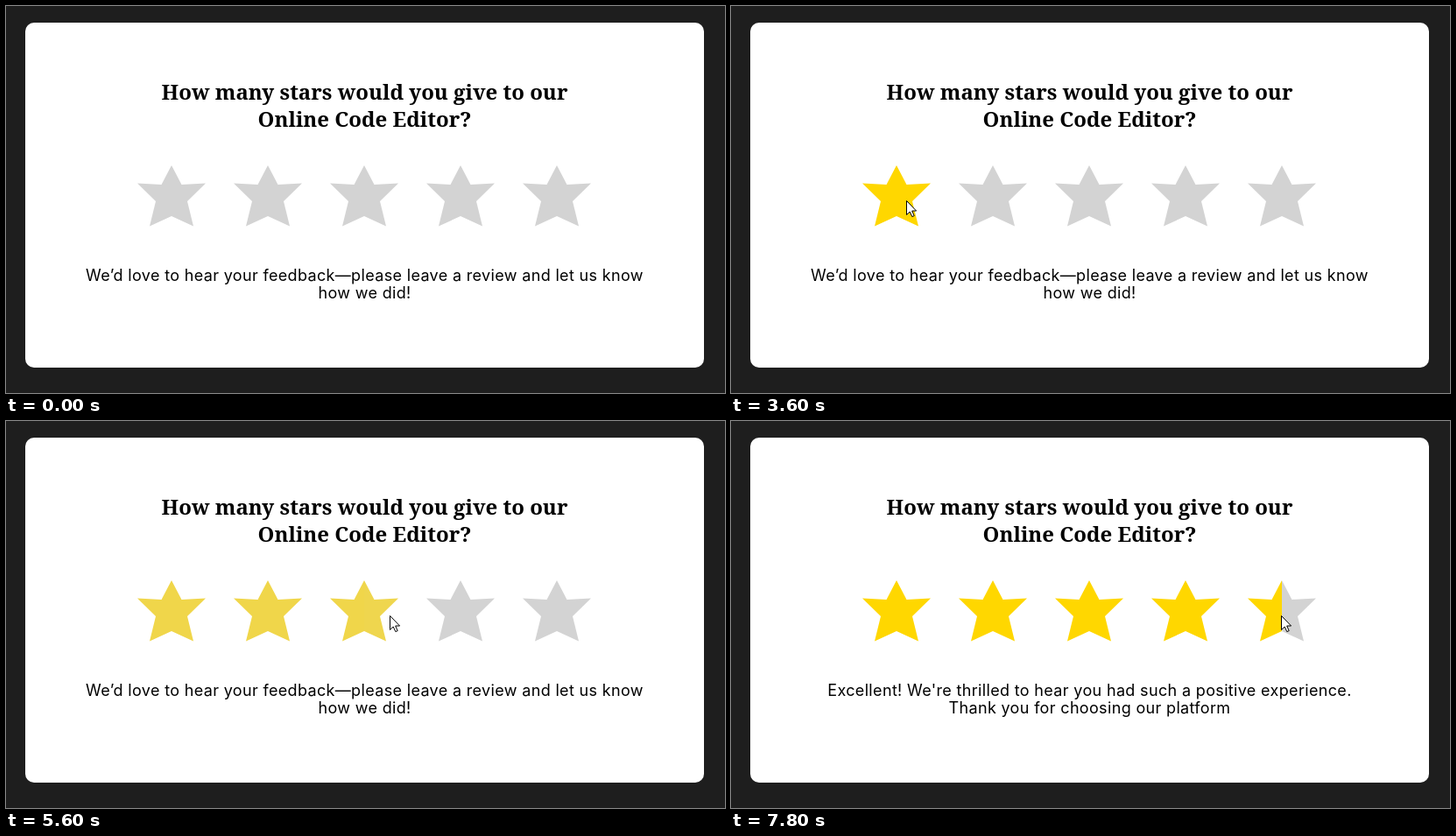
An HTML page for the animation above (8 s loop, 821x442 px).

```html
<!DOCTYPE html>
<html lang="en">
<head>
<meta charset="utf-8">
<title>Star rating</title>
<style>
  html, body { margin: 0; width: 100%; height: 100%; overflow: hidden; background: #1e1e1e; }
  svg { display: block; }
  text { text-anchor: middle; }
  .title { font: 700 24px "Noto Serif", serif; }
  .note { font: 400 18px Inter, sans-serif; letter-spacing: .34px; }
</style>
</head>
<body>
<svg width="821" height="442" viewBox="0 0 821 442">
  <rect x="22" y="19" width="775" height="394" rx="10" fill="#fff"/>
  <g class="title">
    <text x="409.5" y="107">How many stars would you give to our</text>
    <text x="409.5" y="138">Online Code Editor?</text>
  </g>
  <g id="stars"></g>
  <g class="note">
    <text x="409.5" y="314"></text>
    <text x="409.5" y="334"></text>
  </g>
  <path id="cursor" d="M.5 .5V16.5L4.2 13 6.8 18.6 9.2 17.6 6.7 12H11.6Z" fill="#fff" stroke="#000"/>
</svg>
<script>
const LOOP = 8000, FPS = 0.015, FADE = 300, CLICK = 7800;
const GREY = [211, 211, 211], GOLD = [255, 215, 0];
const PROMPT = ["We’d love to hear your feedback—please leave a review and let us know", "how we did!"];
const THANKS = ["Excellent! We're thrilled to hear you had such a positive experience.", "Thank you for choosing our platform"];

// Pointer path: time, x, y
const path = [
  [600, 359, 428], [1000, 240, 358], [1330, 172, 330], [1400, 172, 330],
  [2266, 159, 281], [2466, 155, 272], [2734, 155, 272], [3066, 179, 222],
  [3200, 179, 222], [3330, 200, 222], [3900, 200, 222], [4400, 280, 222],
  [4560, 299, 222], [4725, 317, 222], [5133, 391, 223], [5300, 409, 223],
  [5533, 428, 222], [5600, 438, 222], [6100, 501, 221], [6365, 519, 220],
  [6400, 525, 220], [6500, 538, 221], [6890, 611, 222], [7100, 628, 222]
];

// Hovered rating: time, number of half stars
const ratings = [
  [2870, 1], [3267, 2], [3970, 0], [4405, 3], [4560, 4], [4725, 0], [5150, 5],
  [5300, 6], [5533, 0], [6100, 7], [6365, 8], [6500, 0], [6890, 9]
];

const stars = document.getElementById("stars");
const cursor = document.getElementById("cursor");
const notes = document.querySelectorAll(".note text");
const halves = [];

for (let i = 0; i < 10; i++) {
  const half = document.createElementNS("http://www.w3.org/2000/svg", "path");
  const side = i % 2 ? 1 : -1;
  half.setAttribute("d", "M0 182L11.5 204 39 202.5 18 223 25 251.5 0 240Z");
  half.setAttribute("transform", `translate(${189 + 110 * (i >> 1)} 0) scale(${side} 1)`);
  stars.append(half);
  halves.push(half);
}

const mix = (a, b, k) => a + (b - a) * k;

// cubic-bezier(.25, .1, .25, 1)
function ease(x) {
  if (x >= 1) return 1;
  let lo = 0, hi = 1, s;
  for (let i = 0; i < 20; i++) {
    s = (lo + hi) / 2;
    if (0.75 * s * (1 - s) + s ** 3 < x) lo = s; else hi = s;
  }
  return 0.3 * s * (1 - s) ** 2 + 3 * s * s * (1 - s) + s ** 3;
}

// Fill of one half star; each rating change starts a fade from the current value
function fillAt(index, t) {
  let from = 0, to = 0, start = 0;
  const value = time => mix(from, to, ease((time - start) / FADE));
  for (const [time, count] of ratings) {
    if (time > t) break;
    const goal = index < count ? 1 : 0;
    if (goal !== to) {
      from = value(time);
      to = goal;
      start = time;
    }
  }
  return value(t);
}

function pointerAt(t) {
  const next = path.findIndex(p => p[0] > t);
  if (next < 0) return path[path.length - 1].slice(1);
  const a = path[next - 1], b = path[next];
  const k = (t - a[0]) / (b[0] - a[0]);
  return [1, 2].map(n => Math.round(mix(a[n], b[n], k)));
}

function draw(now) {
  const t = Math.floor((now % LOOP + 4) * FPS) / FPS + 0.01;
  halves.forEach((half, i) => {
    const k = fillAt(i, t);
    half.setAttribute("fill", `rgb(${GREY.map((c, n) => Math.round(mix(c, GOLD[n], k)))})`);
  });
  const visible = t >= path[0][0];
  cursor.style.display = visible ? "" : "none";
  if (visible) cursor.setAttribute("transform", `translate(${pointerAt(t)})`);
  const lines = t >= CLICK ? THANKS : PROMPT;
  notes.forEach((note, i) => {
    if (note.textContent !== lines[i]) note.textContent = lines[i];
  });
}

const begin = performance.now();
function tick() {
  draw(performance.now() - begin);
  requestAnimationFrame(tick);
}
tick();
</script>
</body>
</html>
```
